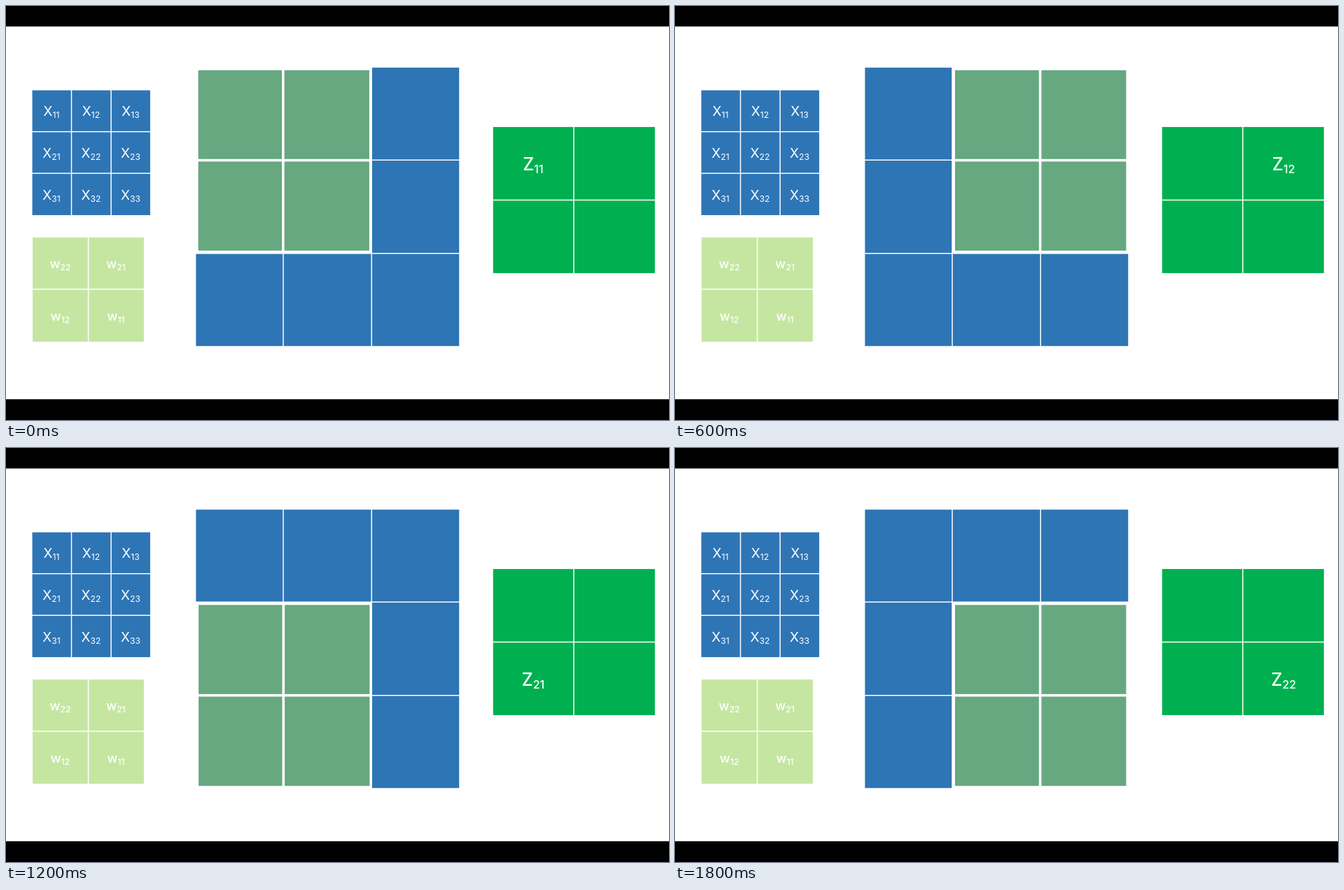
Write an HTML page that moves like this. It is 947 by 592 pixels and loops after 2.4 s.

```html
<!DOCTYPE html>
<html lang="en">
<head>
<meta charset="utf-8">
<title>2×2 convolution over a 3×3 input</title>
<style>
html, body { margin: 0; width: 100%; height: 100%; overflow: hidden; background: #fff; }
svg { display: block; width: 947px; height: 592px; }
text { font-family: Inter, Roboto, sans-serif; fill: #fff; text-anchor: middle; }
</style>
</head>
<body>
<svg id="stage" viewBox="0 0 947 592"></svg>
<script>
const STEP_MS = 600;
const BLUE = '#2e75b6', LIME = '#c5e6a1', GREEN = '#00b050', SAGE = '#66a880';
const stage = document.getElementById('stage');

const rect = (x, y, w, h, fill) =>
  `<rect x="${x}" y="${y}" width="${w}" height="${h}" fill="${fill}"/>`;

// Cells between the given border positions, separated by a gap
function grid(xs, ys, gap, fill, visible = () => true) {
  let out = '';
  for (let r = 0; r < ys.length - 1; r++)
    for (let c = 0; c < xs.length - 1; c++)
      if (visible(r, c))
        out += rect(xs[c] + gap / 2, ys[r] + gap / 2,
          xs[c + 1] - xs[c] - gap, ys[r + 1] - ys[r] - gap, fill);
  return out;
}

function label(name, sub, x, y, size, subSize, drop, weight) {
  return `<text x="${x}" y="${y}" font-size="${size}" font-weight="${weight}">${name}` +
    `<tspan dy="${drop}" font-size="${subSize}">${sub}</tspan></text>`;
}

function fixedParts() {
  let out = rect(0, 0, 947, 29.3, '#000') + rect(0, 562.3, 947, 29.7, '#000');
  out += grid([36.8, 93.5, 150.1, 206.7], [119.8, 179.7, 239.3, 299.8], 1.5, BLUE);
  out += grid([37.3, 117.6, 197.6], [330.3, 405, 480.8], 1.5, LIME);
  out += grid([695, 811, 927.6], [172.3, 277.5, 382.7], 1.5, GREEN);
  for (let r = 0; r < 3; r++)
    for (let c = 0; c < 3; c++)
      out += label('X', `${r + 1}${c + 1}`, 65 + 56.5 * c, 157 + 60 * r, 19, 12.2, 3.3, 400);
  for (let r = 0; r < 2; r++)
    for (let c = 0; c < 2; c++)
      out += label('w', `${2 - r}${2 - c}`, 77.5 + 79.5 * c, 375 + 74.7 * r, 18, 12.2, 3.3, 500);
  return out;
}

function windowParts(step) {
  const row = step >> 1, col = step & 1;
  const covered = (r, c) => r >= row && r <= row + 1 && c >= col && c <= col + 1;
  const nudge = row * 0.5;
  const xs = col ? [398.2, 521.6, 646.2] : [272.8 + nudge, 395.8 + nudge, 520.7 + nudge];
  const ys = row ? [222.6, 353.7, 485] : [90, 220.6, 351.6];
  return grid([270.6, 396, 522.2, 648], [87.4, 220.3, 353.8, 487], 1.5, BLUE,
      (r, c) => !covered(r, c)) +
    grid(xs, ys, 3.6, SAGE) +
    label('Z', `${row + 1}${col + 1}`, 753 + 116.3 * col, 234.7 + 105 * row, 25, 16, 4.2, 500);
}

const fixed = fixedParts();
let shown = -1;

function draw(now) {
  const step = Math.floor(now / STEP_MS) % 4;
  if (step !== shown) {
    stage.innerHTML = fixed + windowParts(step);
    shown = step;
  }
  requestAnimationFrame(draw);
}
draw(performance.now());
</script>
</body>
</html>
```
